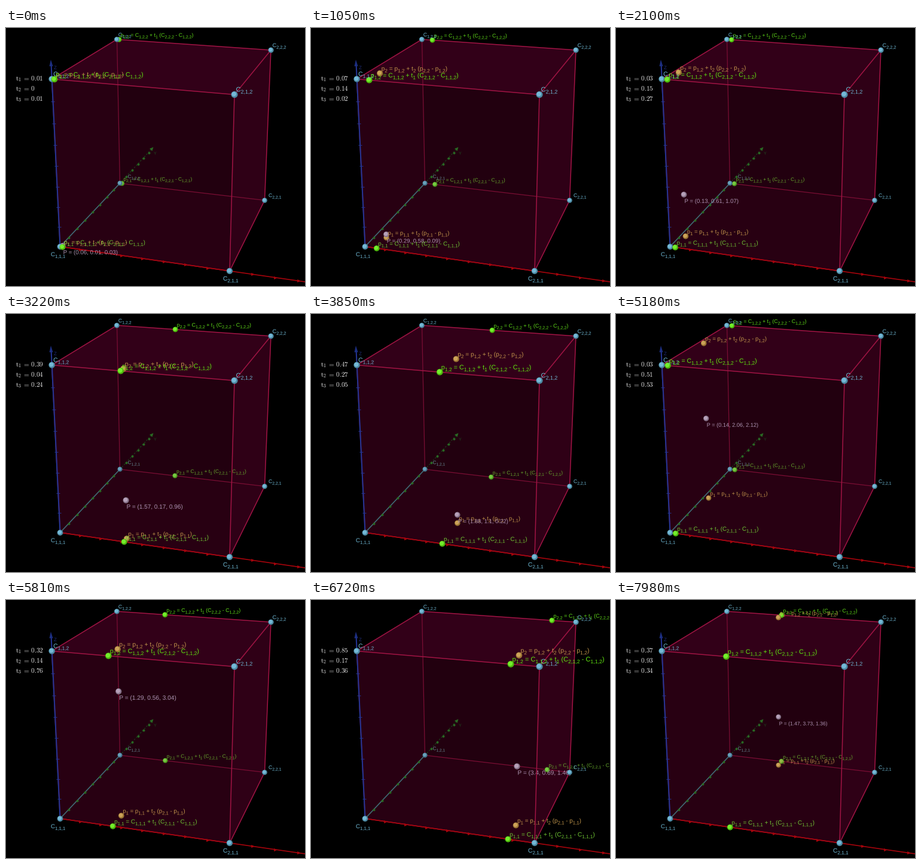
A matplotlib script that plays this animation: 500 px wide and 432 px high, repeating every 8 s.

```python
import itertools

import numpy as np
import matplotlib.pyplot as plt
from matplotlib.animation import FuncAnimation
from matplotlib.patches import Circle, PathPatch, Polygon
from matplotlib.path import Path
from matplotlib.textpath import TextPath
from matplotlib.transforms import Affine2D

W, H = 500, 432
LOOP, TICK, HOLD = 8000, 20, 70
FONT = dict(family="Liberation Sans")
EM = 100

plt.rcParams["mathtext.fontset"] = "cm"


def rgb(r, g, b):
    return r / 255, g / 255, b / 255


BLUE = rgb(98, 176, 208)
LIME = rgb(98, 236, 16)
MOSS = rgb(100, 196, 40)
ORANGE = rgb(198, 150, 66)
LILAC = rgb(172, 148, 176)
CRIMSON = rgb(160, 20, 68)
WINE = rgb(122, 14, 52)

# cube corners (x, y, z) on the stage
CORNERS = {
    (0, 0, 0): (90.5, 366), (1, 0, 0): (374, 407),
    (0, 1, 0): (190.5, 260), (1, 1, 0): (432.5, 288.5),
    (0, 0, 1): (76.5, 85.5), (1, 0, 1): (382, 111.5),
    (0, 1, 1): (185.5, 19), (1, 1, 1): (443, 37),
}


def fit_camera():
    rows, rhs = [], []
    for (x, y, z), (u, v) in CORNERS.items():
        rows.append([x, y, z, 1, 0, 0, 0, 0, -u * x, -u * y, -u * z])
        rows.append([0, 0, 0, 0, x, y, z, 1, -v * x, -v * y, -v * z])
        rhs += [u, v]
    sol = np.linalg.lstsq(np.array(rows, float), np.array(rhs), rcond=None)[0]
    return np.append(sol, 1).reshape(3, 4)


CAMERA = fit_camera()


def project(x, y, z):
    """Stage position and label size of a point in cube units."""
    u, v, w = CAMERA @ (x, y, z, 1)
    return u / w, v / w, 9.7 / w


fig = plt.figure(figsize=(W / 100, H / 100), dpi=100, facecolor="black")
ax = fig.add_axes([0, 0, 1, 1])
ax.set_xlim(0, W)
ax.set_ylim(H, 0)
ax.axis("off")


# ---- text as paths, with [..] marking a subscript

def right_edge(text):
    return TextPath((0, 0), text, size=EM, prop=FONT).get_extents().x1


def label_path(markup):
    parts, x = [], 0
    for i, run in enumerate(markup.replace("]", "[").split("[")):
        if not run:
            continue
        scale, drop = (0.8, -0.3 * EM) if i % 2 else (1, 0)
        glyphs = TextPath((0, 0), run, size=EM, prop=FONT)
        place = Affine2D().scale(scale).translate(x, drop)
        parts.append(place.transform_path(glyphs))
        x += scale * (right_edge(run + "|") - right_edge("|"))
    return Path.make_compound_path(*parts)


class Label:
    def __init__(self, markup, color, z=6):
        self.patch = PathPatch(label_path(markup), fc=color, lw=0, zorder=z)
        self.patch.set_snap(False)
        ax.add_patch(self.patch)

    def move(self, x, y, size):
        s = size / EM
        self.patch.set_transform(
            Affine2D().scale(s, -s).translate(x, y) + ax.transData)


class Ball:
    def __init__(self, color, z=5):
        light = tuple(c + (1 - c) * 0.12 for c in color)
        dark = tuple(c * 0.78 for c in color)
        self.rim = Circle((0, 0), 1, fc=dark, lw=0, zorder=z)
        self.core = Circle((0, 0), 1, fc=light, lw=0, zorder=z)
        ax.add_patch(self.rim)
        ax.add_patch(self.core)

    def move(self, x, y, size):
        r = 0.5 * size
        self.rim.center = x, y
        self.rim.radius = r
        self.core.center = x - 0.15 * r, y - 0.15 * r
        self.core.radius = 0.7 * r


class Marker:
    """A ball with a label that both follow a point in the cube."""

    def __init__(self, color, markup, ink=None, shift=(2.5, -4.6), z=6):
        self.ball = Ball(color, z - 1)
        self.label = Label(markup, ink or color, z)
        self.shift = shift

    def move(self, point):
        x, y, size = project(*point)
        self.ball.move(x, y, size)
        self.label.move(x + self.shift[0], y + self.shift[1], size)


# ---- fixed scenery

def face(keys, color, z):
    ax.add_patch(Polygon([CORNERS[k] for k in keys], fc=color, lw=0, zorder=z))


def line(a, b, color, lw, z):
    ax.plot(*zip(a, b), color=color, lw=lw, zorder=z, solid_capstyle="round")


def draw_cube():
    face([(0, 0, 0), (1, 0, 0), (1, 0, 1), (0, 0, 1)], rgb(40, 0, 18), 0.1)
    face([(0, 1, 0), (1, 1, 0), (1, 1, 1), (0, 1, 1)], rgb(34, 0, 15), 0.2)
    face([(1, 0, 0), (1, 1, 0), (1, 1, 1), (1, 0, 1)], rgb(47, 0, 22), 0.3)
    face([(0, 0, 1), (1, 0, 1), (1, 1, 1), (0, 1, 1)], rgb(50, 0, 24), 0.4)
    for a, b in itertools.combinations(CORNERS, 2):
        if sum(p != q for p, q in zip(a, b)) != 1:
            continue
        hidden = (0, 1, 0) in (a, b)
        near = (a, b) == ((1, 0, 0), (1, 0, 1))
        line(CORNERS[a], CORNERS[b], WINE if hidden else CRIMSON,
             0.9 if hidden else 1.1, 6.5 if near else 2)


def ticks(axis, steps, color, marker, size):
    spots = [project(*(s / 8 * np.eye(3)[axis]))[:2] for s in steps]
    ax.plot(*zip(*spots), ls="", marker=marker, ms=size, color=color,
            mew=0.7, zorder=3)


def draw_axes():
    origin = CORNERS[0, 0, 0]
    red, green, navy = rgb(166, 4, 12), rgb(42, 104, 36), rgb(36, 52, 146)
    line(origin, project(1.6, 0, 0)[:2], red, 1.2, 3)
    ticks(0, range(1, 13), red, ">", 2.8)

    line(origin, CORNERS[0, 1, 0], rgb(56, 112, 120), 1.1, 3)
    ax.plot(*zip(CORNERS[0, 1, 0], (245, 201)), color=rgb(28, 66, 28),
            lw=0.9, ls=(0, (2, 2)), zorder=3)
    ticks(1, range(1, 14), green, "o", 2.2)
    ax.add_patch(Polygon([(246.5, 199.5), (240, 202), (244.5, 206)],
                         fc=green, lw=0, zorder=3))
    Label("Y", rgb(32, 72, 32), 3).move(247, 212, 7)

    line(origin, (75.5, 60), navy, 1.5, 3)
    ticks(2, range(1, 9), navy, "_", 4)
    ax.add_patch(Polygon([(75, 53), (72.5, 64), (78.5, 64)],
                         fc=rgb(28, 46, 128), lw=0, zorder=3))
    Label("Z", rgb(30, 44, 120), 3).move(80, 69, 8)


def draw_corners():
    shifts = {(0, 0, 0): (-15.5, 16), (1, 0, 0): (-11, 16),
              (0, 1, 0): (13, -8.5), (1, 1, 0): (6.5, -5.5)}
    for key in CORNERS:
        name = "C[%d,%d,%d]" % tuple(k + 1 for k in key)
        rear = key == (0, 1, 0)
        ink = rgb(104, 140, 150) if rear else rgb(112, 186, 214)
        ball = rgb(84, 148, 178) if rear else BLUE
        Marker(ball, name, ink, shifts.get(key, (2.5, -5)), 8).move(key)


draw_cube()
draw_axes()
draw_corners()

# ---- moving parts


def edge_formula(j, k):
    return f"p[{j},{k}] = C[1,{j},{k}] + t[1] (C[2,{j},{k}] - C[1,{j},{k}])"


def face_formula(k):
    return f"p[{k}] = p[1,{k}] + t[2] (p[2,{k}] - p[1,{k}])"


edge_marks = {
    (1, 0): Marker(MOSS, edge_formula(2, 1), rgb(104, 172, 46)),
    (1, 1): Marker(LIME, edge_formula(2, 2), rgb(98, 222, 26)),
    (0, 0): Marker(LIME, edge_formula(1, 1), rgb(112, 198, 52), z=8),
    (0, 1): Marker(LIME, edge_formula(1, 2), z=8),
}
face_marks = {k: Marker(ORANGE, face_formula(k + 1), rgb(196, 152, 76))
              for k in (0, 1)}
inner = Marker(LILAC, "P", shift=(1, 14))
readouts = [ax.text(16.5, 88 + 17 * i, "", color=rgb(226, 226, 226),
                    fontsize=8.1, va="baseline", zorder=9) for i in range(3)]

# sum t1 + t2 + t3 grows almost steadily, with one short rest
STEPS = [0, 30, 46, 64, 83, 96, 104, 105, 114]
SUMS = [0.0238, 0.4525, 0.6725, 0.9225, 1.2225, 1.3875, 1.505, 1.505, 1.64]


def parameters(step):
    """Conical helix around the main diagonal of the cube."""
    total = np.interp(step, STEPS, SUMS)
    radius = np.interp(total, [0, 1.35, 1.64], [0, 0.4065, 0.386])
    angle = np.radians(-30 + 529.1 * total - 120 * np.arange(3))
    return total / 3 + radius * np.cos(angle)


def number(v):
    return f"{round(v, 2):g}"


def draw(tick):
    # the middle of the tick decides which step is on show
    t = parameters((tick * TICK + TICK // 2) // HOLD)
    for (y, z), mark in edge_marks.items():
        mark.move((t[0], y, z))
    for z, mark in face_marks.items():
        mark.move((t[0], t[1], z))
    coords = ", ".join(number(4 * v) for v in t)
    inner.label.patch.set_path(label_path(f"P = ({coords})"))
    inner.move(t)
    for i, text in enumerate(readouts):
        text.set_text(rf"$\mathrm{{t}}_{i + 1}\,=\,{number(t[i])}$")
    return []


anim = FuncAnimation(fig, draw, frames=LOOP // TICK, interval=TICK,
                     init_func=lambda: draw(0), repeat=True, repeat_delay=0)
plt.show()
```
